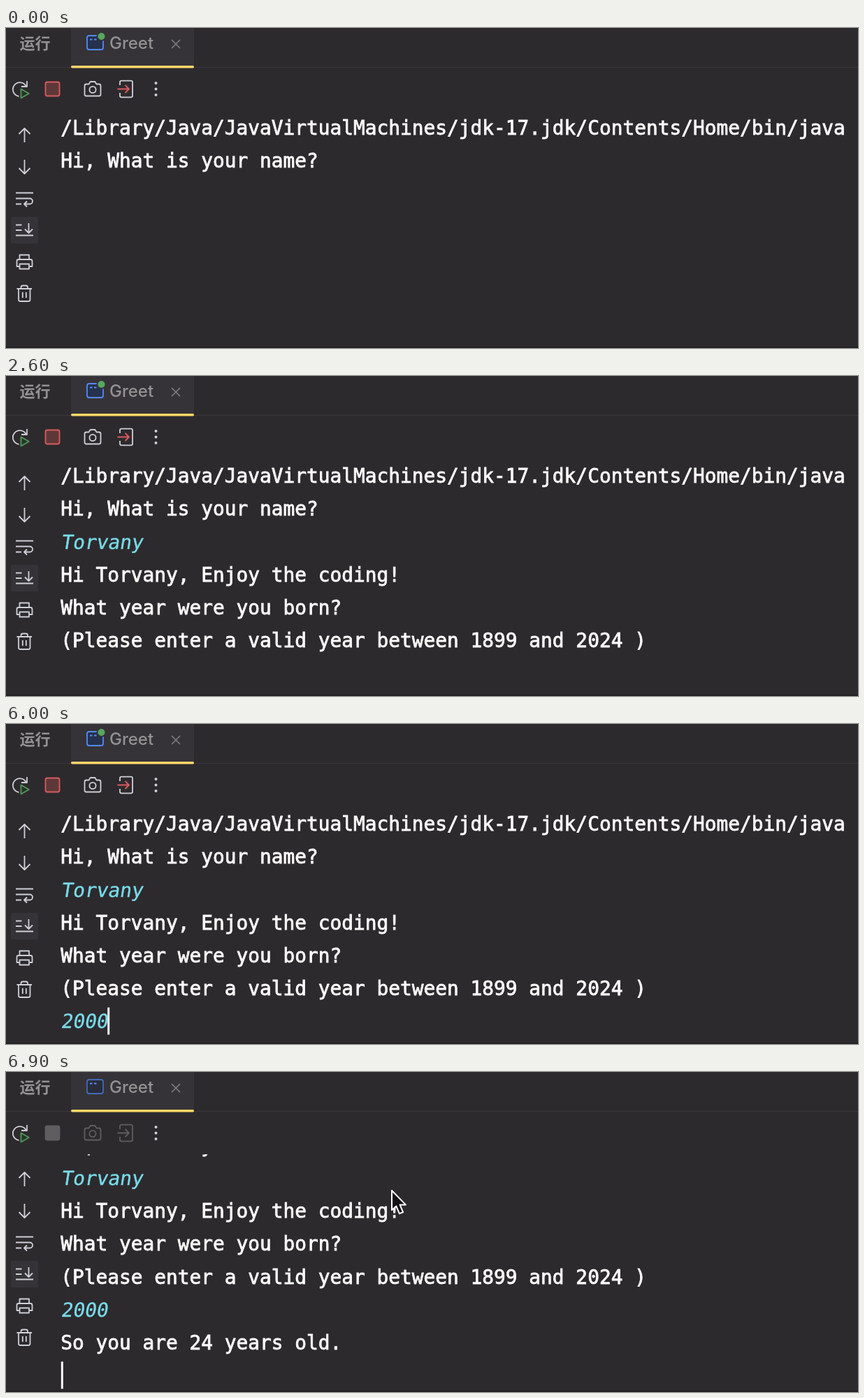
Write an HTML page that moves like this. It is 1219 by 459 pixels and loops after 7010 ms.

```html
<!DOCTYPE html>
<html lang="zh">
<head>
<meta charset="utf-8">
<title>Console session</title>
<style>
  html, body { margin: 0; width: 100%; height: 100%; overflow: hidden; background: #2d2a2e; }
  svg { display: block; width: 1219px; height: 459px; }
  .console text {
    font: 27.84px "DejaVu Sans Mono", "Noto Sans Mono", monospace;
    white-space: pre; fill: #fcfcfa; stroke: #fcfcfa; stroke-width: .8;
  }
  .console .input { fill: #78dce8; stroke: #78dce8; stroke-width: .4; }
  .icon { fill: none; stroke: #ced0d6; stroke-width: 1.8; stroke-linejoin: round; }
  .exit { stroke: #db5c5c; }
  .stop { fill: #5e3838; stroke: #db5c5c; stroke-width: 1.8; }
  .app { fill: #25324d; stroke: #548af7; stroke-width: 1.8; }
  .done .app { fill: #292d3a; stroke: #416bb8; }
  .done .live { display: none; }
  .done .stop { fill: #5f5d60; stroke: #5f5d60; }
  .done .job, .done .exit { stroke: #5f5d60; }
  .pointer { display: none; }
  .pointed .pointer { display: inline; }
</style>
</head>
<body>
<svg id="stage" viewBox="0 0 1219 459">
  <defs><clipPath id="view"><rect x="50" y="118" width="1169" height="339"/></clipPath></defs>
  <rect width="1219" height="459" fill="#2d2a2e"/>

  <!-- tab bar -->
  <rect y="56" width="1219" height="1" fill="#3a373b"/>
  <rect x="93" width="176" height="56" fill="#363338"/>
  <rect x="93" y="54" width="176" height="3.5" rx="1.7" fill="#ffd866"/>
  <text x="19.5" y="30" font-size="22" font-weight="700" fill="#939293" font-family="'Noto Sans CJK SC', 'Noto Sans CJK', sans-serif">运行</text>
  <rect class="app" x="116" y="11" width="23" height="20" rx="3"/>
  <path d="M120 16.5h3.5M126 16.5h3.5" stroke="#548af7" stroke-width="2"/>
  <circle class="live" cx="136.5" cy="12" r="6" fill="#57a85c" stroke="#363338" stroke-width="2"/>
  <text x="148" y="30" font-size="24" font-weight="500" fill="#939293" font-family="Inter, sans-serif">Greet</text>
  <path d="M237 17l12 12M249 17l-12 12" stroke="#7f7d80" stroke-width="1.6"/>

  <!-- toolbar -->
  <g class="icon">
    <path d="M18.5 98A10 10 0 1 1 28.5 83M30 76v8h-8"/>
    <path d="M21.5 87.5v13l11.3-6.5z" stroke="#57965c" fill="#253627"/>
    <rect class="stop" x="56.5" y="77.5" width="20" height="20" rx="2.5"/>
    <g class="job">
      <path d="M115 80.5h3.5l2.2-3.5h6.6l2.2 3.5h3.5q2.5 0 2.5 2.5v12q0 2.5-2.5 2.5h-18q-2.5 0-2.5-2.5v-12q0-2.5 2.5-2.5z"/>
      <circle cx="124" cy="88.5" r="4.6"/>
      <path d="M163 82v-4q0-2.3 2.3-2.3h13.4q2.3 0 2.3 2.3v19q0 2.3-2.3 2.3h-13.4q-2.3 0-2.3-2.3v-4"/>
    </g>
    <path class="exit" d="M159.5 87.5h16M170.5 82l5.5 5.5-5.5 5.5"/>
  </g>
  <g fill="#ced0d6">
    <circle cx="214.5" cy="79" r="2"/><circle cx="214.5" cy="87.5" r="2"/><circle cx="214.5" cy="96" r="2"/>
  </g>

  <!-- side bar -->
  <rect x="7" y="271" width="39" height="38" rx="2" fill="#363338"/>
  <g class="icon">
    <path d="M26.5 164v-20M18.5 152l8-8 8 8"/>
    <path d="M26.5 189v20M18.5 201l8 8 8-8"/>
    <path d="M14 236.5h25M14 244.5h20a4 4 0 0 1 0 8h-8M30 248.5l-4 4 4 4M14 252.5h8"/>
    <path d="M14 282.5h8.5M14 290h8.5M14 297.5h25M32.5 280v13.5M27 288.5l5.5 5.5 5.5-5.5"/>
    <path d="M19.5 332v-6.5h13.5v6.5M19.5 342h-4v-7.5q0-2.5 2.5-2.5h17q2.5 0 2.5 2.5v7.5h-4M19.5 338.5h13.5v7h-13.5z"/>
    <path d="M15.5 374h21.5M21.5 374v-2q0-2.5 2.5-2.5h4.5q2.5 0 2.5 2.5v2M18 374v15.5q0 2.5 2.5 2.5h11.5q2.5 0 2.5-2.5v-15.5M23.8 379v8M28.8 379v8"/>
  </g>

  <g class="console" clip-path="url(#view)">
    <g id="lines"></g>
    <rect id="caret" width="3" height="39" fill="#fcfcfa"/>
  </g>
  <rect y="457" width="1219" height="2" fill="#232124"/>
  <path class="pointer" d="M552 170v28l6.3-5.6 4.6 10.8 5.2-2.2-4.6-10.6h8.3z" fill="#111" stroke="#fff" stroke-width="2" stroke-linejoin="round"/>
</svg>
<script>
  const LOOP = 7010, LEFT = 78.2, BASE = 153.2, PITCH = 47.2;
  const CARET_LEFT = 78.8, ADVANCE = 16.6;
  const FINISHED = 6700, POINTED = 6800;

  const transcript = [
    "/Library/Java/JavaVirtualMachines/jdk-17.jdk/Contents/Home/bin/java",
    "Hi, What is your name?",
    "Torvany",
    "Hi Torvany, Enjoy the coding!",
    "What year were you born?",
    "(Please enter a valid year between 1899 and 2024 )",
    "2000",
    "So you are 24 years old."
  ];
  const inputs = [2, 6];

  // time, complete lines, characters typed on the next line, caret shown
  const steps = [
    [0, 2, 0, 0], [100, 2, 0, 1], [200, 2, 1, 1], [300, 2, 2, 1], [400, 2, 3, 1],
    [600, 2, 4, 1], [800, 2, 5, 1], [1000, 2, 6, 1], [1200, 2, 7, 1],
    [1500, 3, 0, 1], [1800, 6, 0, 1],
    [2500, 6, 0, 0], [3000, 6, 0, 1], [3600, 6, 0, 0], [4100, 6, 0, 1],
    [4500, 6, 1, 1], [5100, 6, 1, 0], [5400, 6, 2, 1], [5800, 6, 3, 1], [6000, 6, 4, 1],
    [6400, 7, 0, 1], [6500, 8, 0, 1]
  ];

  const stage = document.getElementById("stage");
  const lines = document.getElementById("lines");
  const caret = document.getElementById("caret");

  const rows = transcript.map((_, i) => {
    const row = document.createElementNS("http://www.w3.org/2000/svg", "text");
    if (inputs.includes(i)) row.setAttribute("class", "input");
    return lines.appendChild(row);
  });

  function draw(t) {
    const [, full, typed, shown] = steps.findLast(s => s[0] <= t);
    const scroll = full > 6 ? (full - 6) * PITCH - 8.8 : 0;
    const baseline = i => BASE + i * PITCH - scroll;

    rows.forEach((row, i) => {
      const length = i < full ? Infinity : i === full ? typed : 0;
      const slant = inputs.includes(i) ? " skewX(-9)" : "";
      row.textContent = transcript[i].slice(0, length);
      row.setAttribute("transform", `translate(${LEFT} ${baseline(i)})${slant}`);
    });

    caret.setAttribute("x", CARET_LEFT + typed * ADVANCE);
    caret.setAttribute("y", baseline(full) - 29.8);
    caret.setAttribute("opacity", shown);
    stage.classList.toggle("done", t >= FINISHED);
    stage.classList.toggle("pointed", t >= POINTED);
  }

  const start = performance.now();
  function tick() {
    draw((performance.now() - start) % LOOP);
    requestAnimationFrame(tick);
  }
  tick();
</script>
</body>
</html>
```
